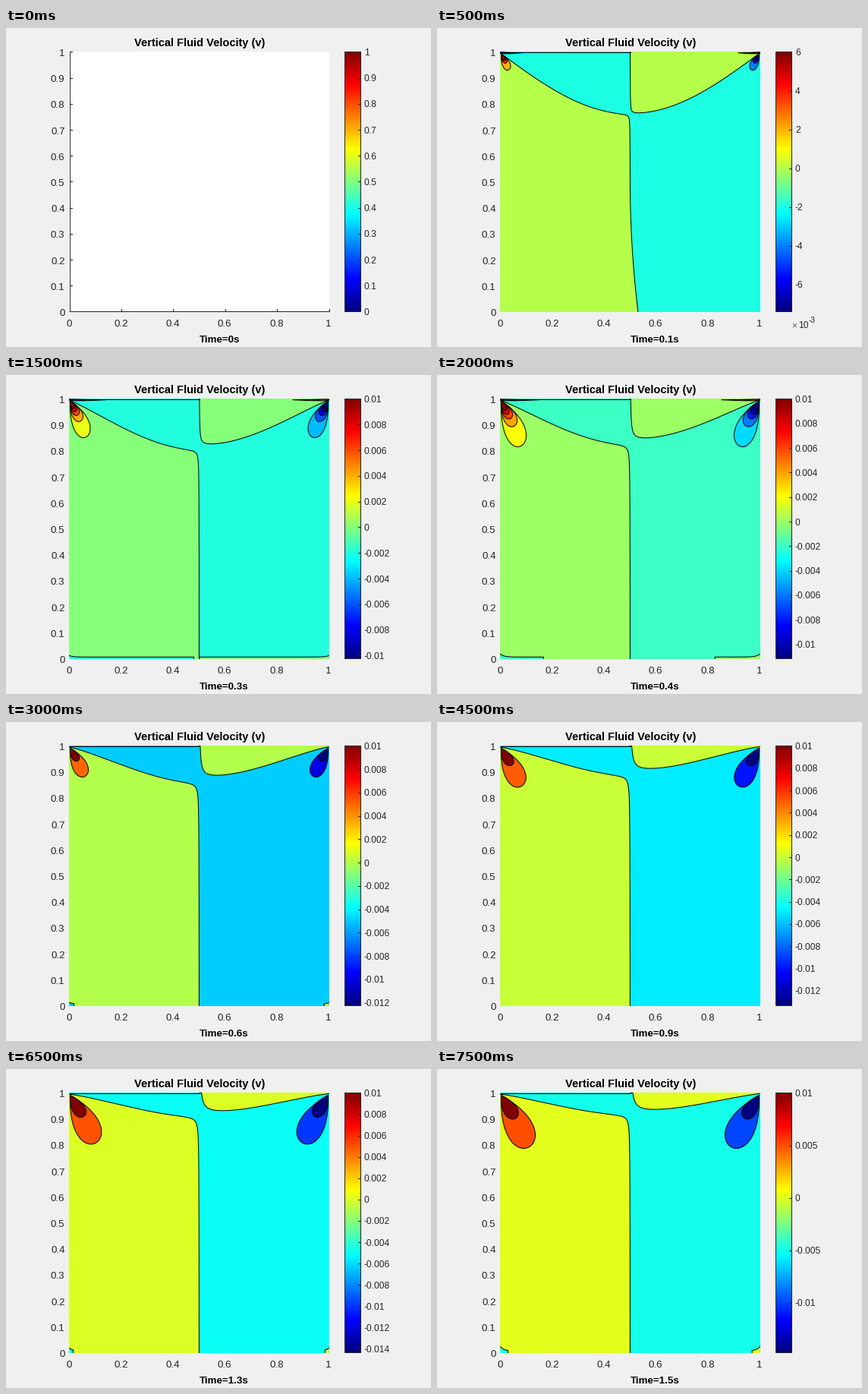
A matplotlib script for the animation above (8 s loop, 560x420 px).

```python
import math
import numpy as np
import matplotlib.pyplot as plt
from matplotlib.animation import FuncAnimation

plt.rcParams["font.family"] = ["Liberation Sans", "DejaVu Sans"]

W, H, DPI = 560, 420, 80
PX = 72 / DPI                       # points per pixel
X0, X1, Y0, Y1 = 83, 425, 31, 373   # outer pixels of the plot box
BAR0, BAR1 = 445, 466               # colour bar
SPAN, MID, LID = 342, 254, 32.5
INK = (0.15, 0.15, 0.15)

# Values over simulated time
TIMES = [0.1, 0.3, 0.4, 0.6, 1.1, 1.5]
LOW = [-0.0074, -0.01024, -0.01117, -0.01226, -0.01388, -0.01477]
DEPTH_L = [80, 65, 58, 46, 31.5, 26.5]
DEPTH_R = [80, 60, 53, 41, 28, 24.5]
POWER = [1, 1.1, 1.1, 1.2, 1.25, 1.2]
BEND_L = [9, 20, 28, 33, 40, 34]
BEND_R = [9, 24, 42, 60, 80, 92]

# Lobe sizes: fine contour steps early on, coarse ones later
FINE_T, FINE_W, FINE_H = [0.1, 0.3, 0.4, 0.5], [12.5, 26.5, 33, 38], [21, 48, 60, 70]
COARSE_T, COARSE_W, COARSE_H = [0.6, 1.1, 1.5], [24, 37, 45], [38, 58, 70]
FINE_RATIO = [(1, 1), (0.64, 0.56), (0.46, 0.39), (0.33, 0.29), (0.23, 0.2)]
COARSE_RATIO = [(1, 1), (0.51, 0.45)]

fig = plt.figure(figsize=(W / DPI, H / DPI), dpi=DPI, facecolor="#f0f0f0")
box = fig.add_axes([X0 / W, 1 - (Y1 + 1) / H, (SPAN + 1) / W, (SPAN + 1) / H])
page = fig.add_axes([0, 0, 1, 1])


def at(t, values, times=TIMES):
    return float(np.interp(math.log(t), np.log(times), values))


def jet(x):
    x = np.asarray(x, float)[..., None]
    return np.clip(1.5 - np.abs(4 * x - np.array([3, 2, 1])), 0, 1)


def mirror(x):
    return X0 + X1 - np.asarray(x)


def text(x, y, s, px, **kw):
    kw.setdefault("color", INK)
    page.text(x, y, s, fontsize=px * PX, va="baseline", **kw)


def line(ax, x, y, color="black", z=2):
    ax.plot(x, y, color=color, lw=PX, zorder=z, solid_capstyle="projecting")


def area(x, y, color, z=1, edge="none"):
    box.fill(x, y, facecolor=color, edgecolor=edge, lw=PX, zorder=z)


def reset(ax, x0, x1, y0, y1):
    """Empty axes whose data units are pixel centres of the stage."""
    ax.clear()
    ax.set(xticks=[], yticks=[], xlim=(x0 - 0.5, x1 + 0.5), ylim=(y1 + 0.5, y0 - 0.5))
    ax.set_autoscale_on(False)
    ax.spines[:].set_visible(False)


def zero_curve(depth, power, bend, side):
    """Zero contour from a top corner to the centre line; side is -1 or 1."""
    s = np.geomspace(MID - X0, bend / 400, 220)
    u = 1 - s / (MID - X0)
    y = LID + depth * np.sin(np.pi / 2 * u ** power) - side * bend / s
    return MID + side * s, np.clip(y, Y0, Y1)


def lobe(width, height):
    """Teardrop leaning away from the top left corner."""
    s = np.linspace(0, 2 * np.pi, 90)
    a = np.sin(s / 2) ** 2
    b = 0.31 * np.sin(s) * np.abs(np.sin(s / 2))
    x, y = 0.5 * a + 0.866 * b, 0.866 * a - 0.5 * b
    return X0 + 1 + width * x / x.max(), 34 + height * y / y.max()


def draw_field(t, lo, hi, step):
    def shade(v):
        return jet(np.clip((v - lo) / (hi - lo), 0, 1))

    warm, cool = shade(0), shade(-step)
    box.set_facecolor(cool)

    # Zero contour and the two warm regions; fills run past the clipped box
    power = at(t, POWER)
    x, y = zero_curve(at(t, DEPTH_L), power, at(t, BEND_L), -1)
    x, y = np.append(x, np.full(40, x[-1])), np.append(y, np.linspace(y[-1], Y1, 40))
    drift = np.interp(t, [0.1, 0.2, 0.3], [10.5, 4, 0])
    x = x + drift * (np.maximum(y - 200, 0) / 174) ** 2
    foot = x[-1]
    area(np.r_[x, foot, X0 - 5, X0 - 5], np.r_[y, Y1 + 5, Y1 + 5, LID], warm)
    line(box, x, y)
    x, y = zero_curve(at(t, DEPTH_R), power, at(t, BEND_R), 1)
    area(np.r_[x, x[-1], X1 + 5, X1 + 5], np.r_[y, Y0 - 5, Y0 - 5, LID], warm)
    line(box, x, y)

    # Thin layers along the floor
    run = np.interp(t, [0.2, 0.3, 0.4, 0.5, 0.6, 0.8, 1.1, 1.5], [0, 164, 57, 20, 6, 0, 0, 10])
    rise = np.interp(t, [0.3, 0.4, 0.6, 1.1, 1.5], [4, 6, 4, 4, 8])
    if run > 1:
        for k, color in ((1, cool), (1.04, warm)):
            d = np.linspace(0, run * k, 60)
            top = Y1 - 2.2 - (rise - 2.2) * np.exp(-d / 5)
            left = color is cool
            xs = X0 + d if left else mirror(X0 + d)
            area(np.r_[xs, xs[-1], xs[0]], np.r_[top, Y1 + 5, Y1 + 5], color, 2.2)
            line(box, np.append(xs, xs[-1]), np.append(top, Y1), z=2.3)
            if left:
                line(box, [X0, xs[-1]], [Y1, Y1], z=2.3)

    # Walls where the cool region touches the box
    line(box, [X0, MID], [Y0, Y0])
    line(box, [X1, X1], [Y0, Y1])
    line(box, [foot, max(foot, X1 - run * 1.04)], [Y1, Y1])

    fine = step < 0.005
    if fine:
        # Slivers under the lid
        reach = at(t, [29, 48, 51, 53], FINE_T)
        for k in (1, 2):
            r = reach / k
            xs = np.array([X0, X0 + r, X0 + 0.4 * r, X0])
            ys = [31.5, 32.2, 33.4, 32.7]
            area(xs, ys, shade(-(k + 1) * step), 2.5, "black")
            area(mirror(xs), ys, shade(k * step), 2.5, "black")

    # Corner lobes, hot on the left and cold on the right
    if fine:
        w, h, ratios = at(t, FINE_W, FINE_T), at(t, FINE_H, FINE_T), FINE_RATIO
    else:
        w, h, ratios = at(t, COARSE_W, COARSE_T), at(t, COARSE_H, COARSE_T), COARSE_RATIO
    for i in range(1, round(hi / step) + 1):
        rw, rh = ratios[i - 1]
        x, y = lobe(w * rw, h * rh)
        area(x, y, shade(i * step), 3, "black")
        area(mirror(x), y, shade(-(i + 1) * step), 3, "black")


def draw_empty():
    box.set_facecolor("white")
    line(page, [X0, X0, X1], [Y0, Y1, Y1], INK)
    for i in range(11):
        y = Y1 - i * SPAN / 10
        line(page, [X0, X0 + 3], [y, y], INK)
    for i in range(6):
        x = X0 + i * SPAN / 5
        line(page, [x, x], [Y1, Y1 - 3], INK)


def draw_bar(lo, hi, step, scale):
    ramp = jet(np.linspace(1, 0, 256))[:, None, :]
    page.imshow(ramp, extent=(BAR0, BAR1, Y1, Y0), aspect="auto", interpolation="nearest")
    line(page, [BAR0, BAR1, BAR1, BAR0, BAR0], [Y0, Y0, Y1, Y1, Y0], INK)
    for i in range(math.ceil(lo / step - 1e-6), math.floor(hi / step + 1e-6) + 1):
        y = Y0 + (hi - i * step) / (hi - lo) * SPAN
        line(page, [BAR1 - 3, BAR1], [y, y], INK)
        text(471.5, y + 4.5, f"{round(i * step * scale, 6):g}", 12)
    if scale > 1:
        text(467, 394.5, "×", 12, color="#606060")
        text(476, 394.5, "10", 12)
        text(489.5, 388, "-3", 10)


def draw(k):
    t = round(k * 0.1, 1)
    reset(box, X0, X1, Y0, Y1)
    reset(page, 0, W - 1, 0, H - 1)
    page.patch.set_visible(False)
    if k == 0:
        draw_empty()
        draw_bar(0, 1, 0.1, 1)
    else:
        lo = at(t, LOW)
        hi = 0.006 if k == 1 else 0.008 if k == 2 else 0.01
        draw_field(t, lo, hi, 0.002 if k < 6 else 0.005)
        draw_bar(lo, hi, 0.002 if k < 15 else 0.005, 1000 if k < 3 else 1)

    for i in range(11):
        text(77, Y1 - i * SPAN / 10 + 5.5, f"{i / 10:g}", 13.33, ha="right")
    for i in range(6):
        text(X0 - 0.5 + i * SPAN / 5, 392.5, f"{i / 5:g}", 13.33, ha="center")
    text(254.5, 24, "Vertical Fluid Velocity (v)", 14.67, ha="center", weight="bold", color="black")
    text(254, 413.5, f"Time={t:g}s", 13.33, weight="bold", color="black")
    return []


anim = FuncAnimation(fig, draw, frames=16, interval=500, init_func=lambda: [],
                     repeat=True, repeat_delay=0, blit=False)
plt.show()
```
